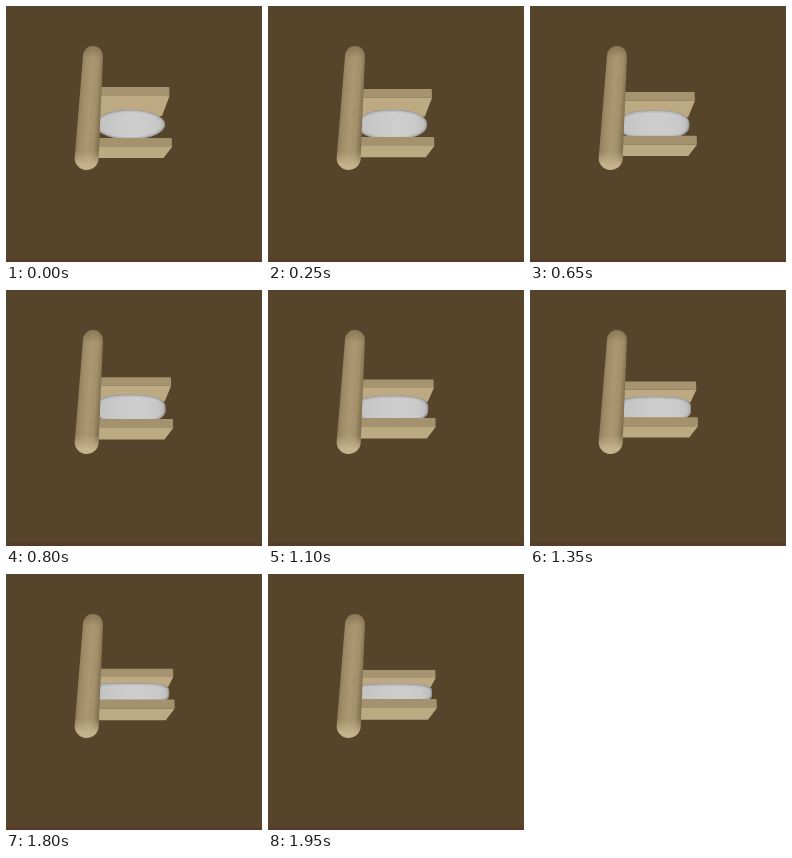
Write an HTML page with a canvas that moves like this. It is 256x256 px and loops after 2000 ms.

```html
<!DOCTYPE html>
<html lang="en">
<head>
<meta charset="utf-8">
<title>Press</title>
<style>
html, body { margin: 0; width: 100%; height: 100%; overflow: hidden; background: #56452a; }
canvas { display: block; width: 256px; height: 256px; }
</style>
</head>
<body>
<canvas id="stage" width="256" height="256"></canvas>
<script>
const ctx = document.getElementById('stage').getContext('2d');
const LOOP = 2000, STEP = 50;
const mix = (a, b, p) => a + (b - a) * p;

function ramp(x0, y0, x1, y1, ...stops) {
  const g = ctx.createLinearGradient(x0, y0, x1, y1);
  for (const [at, color] of stops) g.addColorStop(at, color);
  return g;
}

function poly(fill, ...points) {
  ctx.beginPath();
  for (const [x, y] of points) ctx.lineTo(x, y);
  ctx.closePath();
  ctx.fillStyle = fill;
  ctx.fill();
}

function backdrop() {
  ctx.fillStyle = '#56452a';
  ctx.fillRect(0, 0, 256, 256);
  ctx.fillStyle = ramp(0, 251, 0, 255, [0, 'rgba(88,58,42,0)'], [1, '#583a2a']);
  ctx.fillRect(0, 251, 256, 5);
}

// Front strip above a lighter underside that narrows away from the viewer
function plate(top, split, bottom, right, inner, dark, light) {
  poly(light, [84, split], [right, split], [inner, bottom], [84, bottom]);
  poly(dark, [84, top], [right - 0.3, top], [right, split], [84, split]);
}

function blob(p) {
  const cx = 124, n = 2 + 1.7 * p;
  const top = 103.5 + 6.5 * p * p;
  const cy = mix(118.5, 119, p);
  const rx = 35 + 5.4 * p ** 2.5;
  const ry = cy - top;
  const pow = v => Math.sign(v) * Math.abs(v) ** (2 / n);
  const shape = new Path2D();
  for (let i = 0; i < 120; i++) {
    const a = i * Math.PI / 60;
    shape.lineTo(cx + rx * pow(Math.cos(a)), cy + ry * pow(Math.sin(a)));
  }
  shape.closePath();
  ctx.save();
  ctx.fillStyle = ramp(92, 0, cx + rx, 0,
    [0, '#c3c3c4'], [0.35, '#cbcbcc'], [0.55, '#cececf'], [0.85, '#c9c9ca'], [1, '#bcbcbc']);
  ctx.fill(shape);
  ctx.clip(shape);
  ctx.strokeStyle = 'rgba(110,110,110,0.16)';
  ctx.lineWidth = 5;
  ctx.stroke(shape);
  ctx.strokeStyle = 'rgba(90,90,90,0.35)';
  ctx.lineWidth = 1.8;
  ctx.stroke(shape);
  ctx.restore();
}

function rod() {
  const shape = new Path2D();
  shape.arc(87, 50, 10, Math.PI + 0.07, 0.07);
  shape.arc(80.7, 152, 12, 0.07, Math.PI + 0.07);
  shape.closePath();
  ctx.save();
  ctx.clip(shape);
  ctx.fillStyle = ramp(71.5, 101, 95, 102.5,
    [0, '#8d7a57'], [0.2, '#a08c67'], [0.5, '#ab9772'], [0.78, '#a38f6a'], [1, '#81704e']);
  ctx.fillRect(66, 38, 34, 128);
  ctx.fillStyle = ramp(0, 39, 0, 52, [0, 'rgba(108,90,60,0.55)'], [1, 'rgba(108,90,60,0)']);
  ctx.fillRect(66, 38, 34, 15);
  ctx.fillStyle = ramp(0, 145, 0, 159, [0, 'rgba(200,182,143,0)'], [1, 'rgba(200,182,143,0.9)']);
  ctx.fillRect(66, 145, 34, 21);
  ctx.restore();
}

function draw(p) {
  backdrop();
  const up = 81 + 15.4 * p;
  plate(up, up + mix(9, 8, p), mix(110, 113, p), mix(163.5, 167.7, p), mix(156, 163, p),
    '#a69370', '#bdaa82');
  blob(p);
  const low = 132 - 7.2 * p;
  plate(low, low + 9, mix(152, 145.5, p), mix(166, 169, p), mix(157.5, 160, p),
    '#a4916d', '#bbaa82');
  rod();
}

const start = performance.now();
function tick() {
  const t = Math.max(0, performance.now() - start) % LOOP;
  draw(Math.floor(t / STEP) * STEP / LOOP);
  requestAnimationFrame(tick);
}
tick();
</script>
</body>
</html>
```
